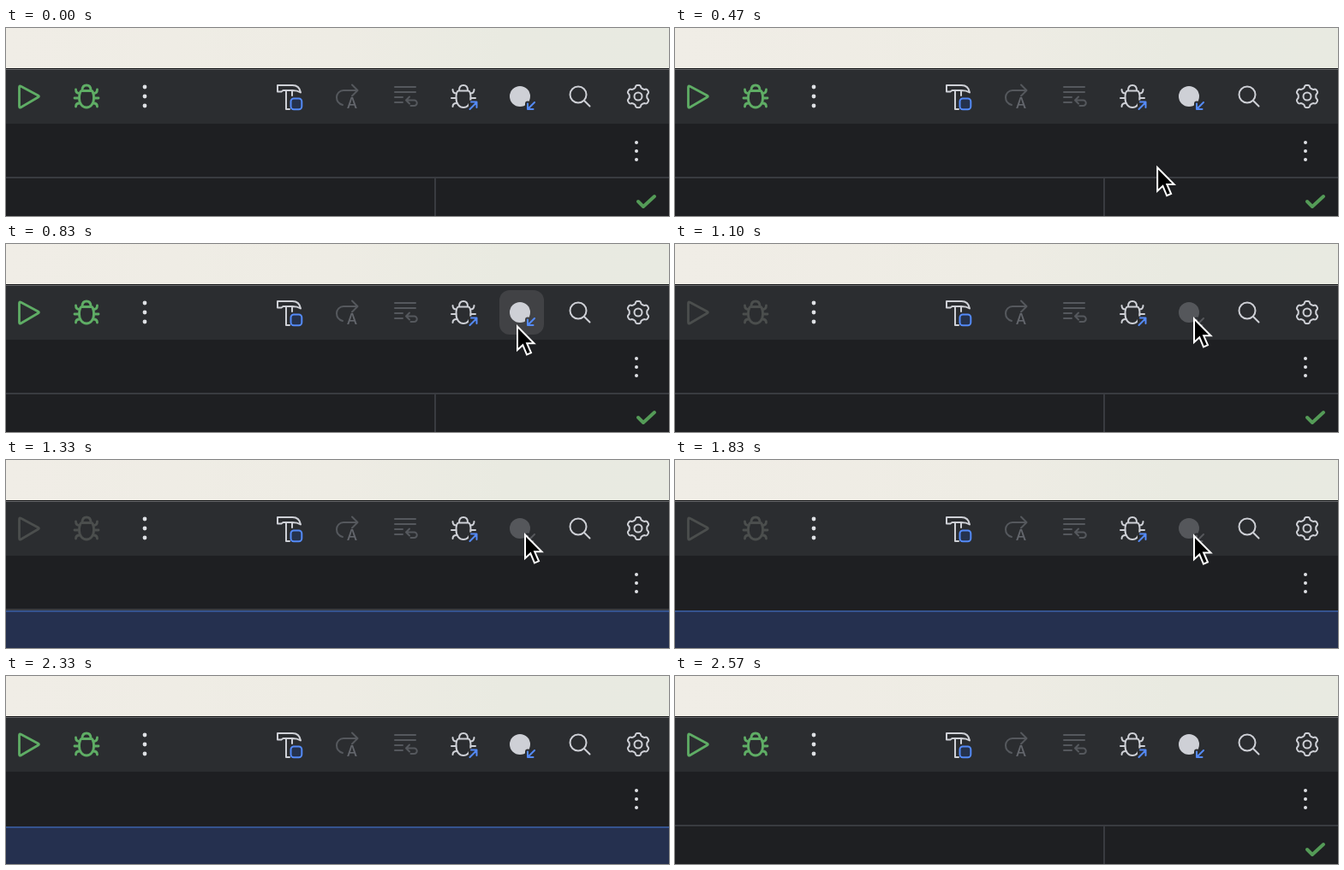
Write an HTML page that moves like this. It is 774x220 px and loops after 3200 ms.

```html
<!DOCTYPE html>
<html lang="en">
<head>
<meta charset="utf-8">
<title>Toolbar sync</title>
<style>
  html, body { margin: 0; width: 100%; height: 100%; overflow: hidden; background: #1e1f22; }
  svg { display: block; width: 774px; height: 220px; --run: #5fad65; --sync: #ced0d6; --arrow: #548af7; --button: #2b2d30; }
  svg.busy { --run: #4b4e4d; --sync: #55575b; --arrow: #55575b; }
  svg.hover { --button: #414245; }
  .icon { fill: none; stroke: #ced0d6; stroke-width: 2; stroke-linecap: round; stroke-linejoin: round; }
  .run { stroke: var(--run); stroke-width: 2.8; }
  .dim { stroke: #55585d; }
  .blue { stroke: #548af7; }
  .dots { fill: #dfe1e5; }
</style>
</head>
<body>
<svg id="stage" viewBox="0 0 774 220">
  <defs>
    <linearGradient id="paper">
      <stop offset="0" stop-color="#f0ede6"/>
      <stop offset=".5" stop-color="#eeece4"/>
      <stop offset=".75" stop-color="#e9eae1"/>
      <stop offset="1" stop-color="#e8eae1"/>
    </linearGradient>
    <g id="bug">
      <path d="M-5.5-6.500h11c2 0 3 4.500 3 8.500 0 7-4 11-8.500 11s-8.500-4-8.500-11c0-4 1-8.500 3-8.500z"/>
      <path d="M-5-7c0-4 2-6 5-6s5 2 5 6"/>
      <path d="M-14 2h5.500M14 2h-5.500M-12.500-8q0 4.500 4.500 4.500M12.500-8q0 4.500-4.500 4.500M-12.500 12q0-4 4.500-4M12.500 12q0-4-4.500-4"/>
    </g>
  </defs>

  <rect width="774" height="47" fill="url(#paper)"/>
  <rect y="47" width="774" height="1" fill="#111214"/>
  <rect y="48" width="774" height="1" fill="#6a6b6d"/>
  <rect y="49" width="774" height="63" fill="#2b2d30"/>
  <rect y="112" width="774" height="108" fill="#1e1f22"/>

  <g class="icon">
    <path class="run" d="M15.500 69.500q0-2.500 2-1.300L37.500 79q1.800 1 0 2L17.500 92.800q-2 1.200-2-1.300z"/>
    <use class="run" href="#bug" x="94" y="80"/>

    <path d="M317 67h17.500c5 0 8.500 3 9.500 8.500-3-2-5-2.500-9.500-2.500h-11l-2 1.500h-4.500zM327 74v21h4M334 74v5"/>
    <rect class="blue" x="332.500" y="82.500" width="12.800" height="12.800" rx="3.500" fill="#25324d"/>

    <path class="dim" d="M410 73h-16a8 8 0 0 0-8 8q0 7 7 9M404 66.500l6.500 6.500-6.500 6.500"/>
    <path class="dim" d="M454 69h24M454 75h24M454 81h9M454 87h9M467 84.500h9.500a3.200 3.200 0 0 1 0 6.500h-4M471 80.500l-4 4 4 4"/>

    <use href="#bug" x="534" y="80"/>
    <rect x="540" y="84.500" width="12" height="13" fill="#2b2d30" stroke="none"/>
    <path class="blue" d="M541.500 95l8-8M543 86.500h6.500v6.500"/>

    <rect id="highlight" x="576" y="54" width="52" height="52" rx="12" fill="#414245" stroke="none"/>
    <circle cx="600" cy="80" r="12" fill="var(--sync)" stroke="none"/>
    <path stroke="var(--button)" stroke-width="6" d="M617 87l-8 8M609 88.500v6.500h6.500"/>
    <path stroke="var(--arrow)" d="M617 87l-8 8M609 88.500v6.500h6.500"/>

    <circle cx="668" cy="78" r="9.500"/>
    <path d="M675 85l6.500 6.500"/>
    <path id="gear"/>
    <circle cx="738" cy="80" r="4.500"/>
  </g>
  <text x="404" y="94" text-anchor="middle" font-family="Inter, sans-serif" font-size="17.500" font-weight="500" fill="#63666c">A</text>

  <g class="dots">
    <circle cx="162" cy="69" r="2.400"/><circle cx="162" cy="80" r="2.400"/><circle cx="162" cy="91" r="2.400"/>
    <circle cx="736" cy="134" r="2"/><circle cx="736" cy="144" r="2"/><circle cx="736" cy="154" r="2"/>
  </g>

  <g id="editor">
    <rect x="500" y="176" width="2" height="44" fill="#393b40"/>
    <path d="M738 203l6 6L757 197" fill="none" stroke="#549b57" stroke-width="4" stroke-linecap="round" stroke-linejoin="round"/>
  </g>
  <rect id="divider" y="174" width="774" height="2" fill="#393b40"/>
  <g id="banner">
    <rect y="176" width="774" height="44" fill="#25304f"/>
    <rect y="176" width="774" height="2" fill="#35538f"/>
  </g>

  <path id="cursor" d="M1 2.500v27.500l6.300-5.800 4.700 11.300 5-2.200-4.800-11H20.500z" fill="#000" stroke="#fff" stroke-width="2"/>
</svg>

<script>
const LOOP = 3200;
const $ = id => document.getElementById(id);
const stage = $('stage');

// Pointer path: time, x, y of the tip.
const pointerPath = [
  [300, 540, 222], [470, 562, 161], [620, 584, 113], [740, 594, 97],
  [800, 596, 94], [870, 596, 94], [1000, 603, 88], [1100, 605, 85], [1800, 605, 85],
  [1830, 605, 86], [1920, 602, 104], [2050, 588, 158], [2170, 562, 222]
];

function pointerAt(t) {
  const next = pointerPath.findIndex(key => key[0] > t);
  if (next < 1) return null;
  const [t0, x0, y0] = pointerPath[next - 1];
  const [t1, x1, y1] = pointerPath[next];
  const k = (t - t0) / (t1 - t0);
  return [x0 + (x1 - x0) * k, y0 + (y1 - y0) * k];
}

function gearPath() {
  const points = Array.from({ length: 120 }, (_, i) => {
    const a = i / 120 * Math.PI * 2;
    const r = 11.7 + 1.5 * Math.tanh(2 * Math.cos(6 * a));
    return `${738 + r * Math.sin(a)} ${80 - r * Math.cos(a)}`;
  });
  return `M${points.join('L')}z`;
}

const between = (t, start, end) => t >= start && t < end;
const show = (id, visible) => $(id).style.display = visible ? '' : 'none';

function draw(t) {
  const pointer = pointerAt(t);
  const busy = between(t, 1000, 2100);
  const syncing = between(t, 1330, 2430);
  const hover = t < 1000 && pointer !== null && pointer[1] < 106;

  stage.classList.toggle('busy', busy);
  stage.classList.toggle('hover', hover);
  show('highlight', hover);
  show('banner', syncing);
  show('editor', !syncing);
  show('divider', !between(t, 1500, 2570));
  show('cursor', pointer !== null);
  if (pointer) $('cursor').setAttribute('transform', `translate(${pointer})`);
}

$('gear').setAttribute('d', gearPath());
const start = performance.now();
function tick() {
  draw((performance.now() - start) % LOOP);
  requestAnimationFrame(tick);
}
tick();
</script>
</body>
</html>
```
